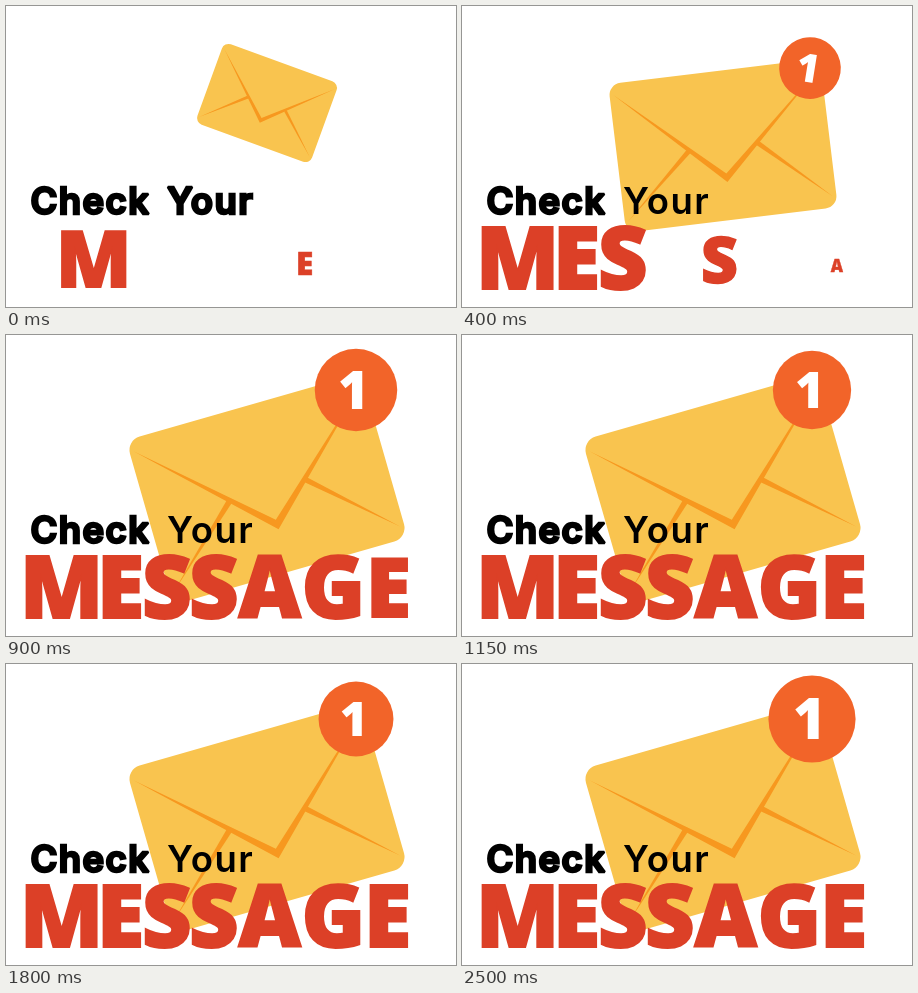
Recreate the animation shown at these times as an HTML page with a canvas. Size 450 by 301 pixels, loop 3 s.

```html
<!DOCTYPE html>
<html lang="en">
<head>
<meta charset="utf-8">
<title>Check Your Message</title>
<style>
  html, body { margin: 0; width: 100%; height: 100%; overflow: hidden; background: #fff; }
  canvas { display: block; }
</style>
</head>
<body>
<canvas id="stage" width="450" height="301"></canvas>
<script>
const ctx = document.getElementById('stage').getContext('2d');
const LOOP = 3000, LAST = 2500, STEP = 50;
// Letters with the horizontal centre of their ink
const WORD = [['M', 55.5], ['E', 116], ['S', 161], ['S', 208], ['A', 264], ['G', 326.5], ['E', 383]];

const clamp = v => Math.max(0, Math.min(1, v));
const mix = (a, b, p) => a + (b - a) * p;

function placed(x, y, degrees, scale, draw) {
  ctx.save();
  ctx.translate(x, y);
  ctx.rotate(degrees * Math.PI / 180);
  ctx.scale(scale, scale);
  draw();
  ctx.restore();
}

function polygon(...points) {
  ctx.beginPath();
  points.forEach(([x, y]) => ctx.lineTo(x, y));
  ctx.closePath();
  ctx.fill();
}

function envelope() {
  ctx.fillStyle = '#f9c44f';
  ctx.beginPath();
  ctx.roundRect(-122, -85.5, 244, 171, 14);
  ctx.fill();
  ctx.fillStyle = '#f7981f';
  for (const side of [-1, 1]) {
    polygon([side * 38, 4], [side * 42, 0], [side * 118, 73]);
  }
  polygon([-118, -73], [0, 32], [118, -73], [0, 42]);
}

function badge() {
  ctx.fillStyle = '#f26429';
  ctx.beginPath();
  ctx.arc(0, 0, 1, 0, Math.PI * 2);
  ctx.fill();
  // Glyph is drawn large, then reduced to the unit badge
  ctx.scale(0.01, 0.01);
  ctx.font = '800 128px "Open Sans", sans-serif';
  ctx.textAlign = 'center';
  ctx.fillStyle = '#fff';
  ctx.fillText('1', -6, 46);
}

function heading(method) {
  ctx.font = '600 36.5px Inter, sans-serif';
  ctx.letterSpacing = '1.4px';
  ctx.textAlign = 'left';
  ctx.fillStyle = ctx.strokeStyle = '#000';
  ctx.lineWidth = 2.5;
  ctx[method]('Check', 24.5, 207.5);
  ctx[method]('Your', 161, 207.5);
  ctx.letterSpacing = '0px';
}

function message(t) {
  ctx.font = '800 86px "Open Sans", sans-serif';
  ctx.textAlign = 'left';
  ctx.fillStyle = ctx.strokeStyle = '#dc4027';
  ctx.lineWidth = 2;
  WORD.forEach(([letter, centre], i) => {
    const scale = clamp((t + 245 - 148 * i) / 270);
    if (!scale) return;
    const ink = ctx.measureText(letter);
    const x = centre - 402 - (ink.actualBoundingBoxRight - ink.actualBoundingBoxLeft) / 2;
    placed(402, 262, 0, scale, () => {
      ctx.strokeText(letter, x, 20.5);
      ctx.fillText(letter, x, 20.5);
    });
  });
}

function render(t) {
  const p = clamp(t / 535);
  const pulse = 40.2 + 3.4 * Math.cos(t / 500 * Math.PI * 2);
  ctx.fillStyle = '#fff';
  ctx.fillRect(0, 0, 450, 301);
  ctx.miterLimit = 2;
  heading('strokeText');
  placed(261, mix(97, 154, p), mix(20, -16, p), mix(0.5, 1, p), envelope);
  if (p) placed(mix(342, 350, p), mix(83, 55, p), mix(36, 0, p), pulse * p, badge);
  heading('fillText');
  message(t);
}

function frame() {
  const t = performance.now() % LOOP;
  render(Math.min(LAST, Math.floor(t / STEP) * STEP));
  requestAnimationFrame(frame);
}
frame();
</script>
</body>
</html>
```
